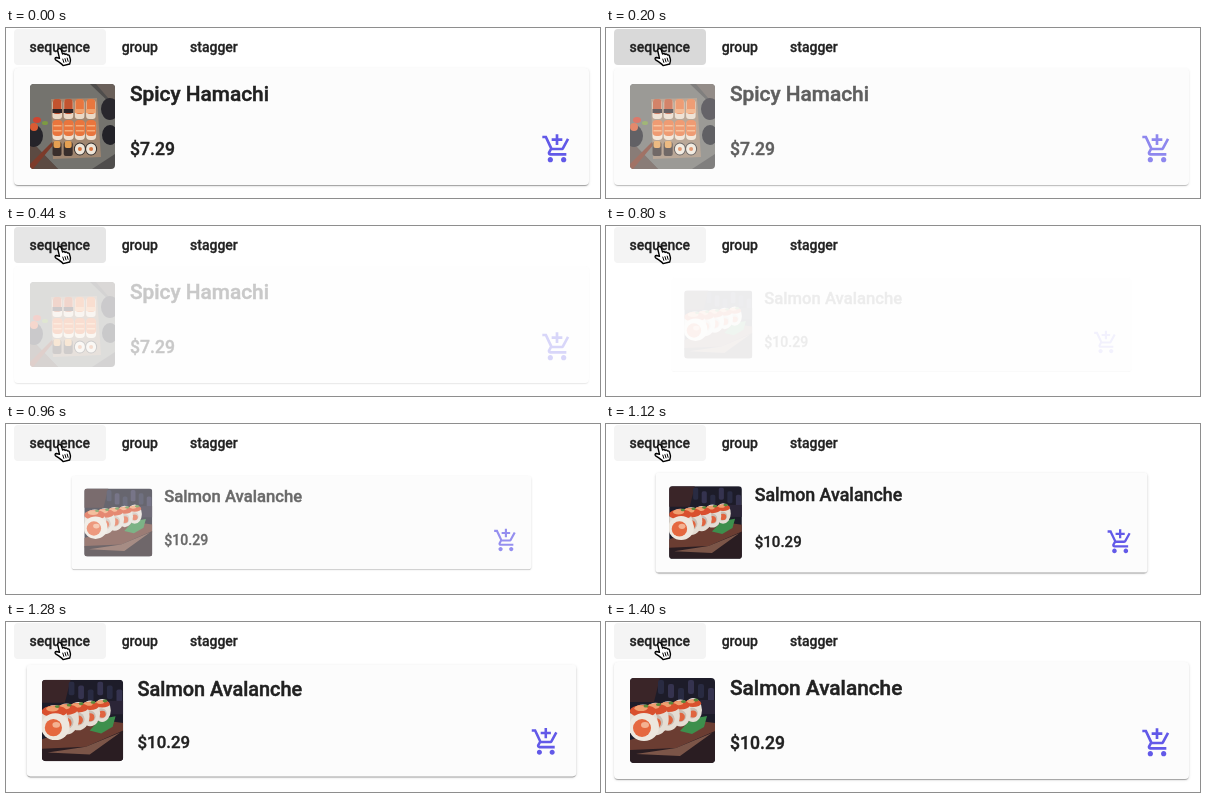
Write an HTML page that moves like this. It is 594 px wide and 170 px high and loops after 1920 ms.

```html
<!DOCTYPE html>
<html lang="en">
<head>
<meta charset="utf-8">
<title>Animated product card</title>
<style>
  html, body { margin: 0; width: 100%; height: 100%; overflow: hidden; background: #fff; }
  svg { position: absolute; left: 0; top: 0; }
  text { font: 500 14px Roboto, Arial, sans-serif; fill: #212121; stroke: #212121; stroke-width: .3px; }
  .card {
    left: 8px; top: 40px; overflow: visible;
    background: #fcfcfc; border-radius: 4px;
    box-shadow: 0 2px 1px -1px rgba(0,0,0,.2), 0 1px 1px rgba(0,0,0,.14), 0 1px 3px rgba(0,0,0,.12);
  }
  .card .title { font-size: 20.8px; stroke-width: .5px; }
  .card .price { font-size: 17.6px; stroke-width: .4px; }
</style>
</head>
<body>
<svg width="594" height="170">
  <defs>
    <clipPath id="button"><rect x="8" y="1" width="92" height="36" rx="4"/></clipPath>
    <clipPath id="photo"><rect width="85" height="85" rx="4"/></clipPath>
    <path id="cart" d="M11 9h2V6h3V4h-3V1h-2v3H8v2h3v3zm-4 9c-1.1 0-1.99.9-1.99 2S5.9 22 7 22s2-.9 2-2-.9-2-2-2zm10 0c-1.1 0-1.99.9-1.99 2s.89 2 1.99 2 2-.9 2-2-.9-2-2-2zm-9.83-3.25l.03-.12.9-1.63h7.45c.75 0 1.41-.41 1.75-1.03l3.86-7.01L19.42 4h-.01l-1.1 2-2.76 5H8.53l-.13-.27L6.16 6l-.95-2-.94-2H1v2h2l3.6 7.59-1.35 2.45c-.16.28-.25.61-.25.96 0 1.1.9 2 2 2h12v-2H7.42c-.13 0-.25-.11-.25-.25z"/>
  </defs>
  <g clip-path="url(#button)">
    <rect x="8" y="1" width="92" height="36" fill="#f4f4f4"/>
    <circle id="ripple" cx="55" cy="22"/>
  </g>
  <text x="23.5" y="24">sequence</text>
  <text x="115.7" y="24">group</text>
  <text x="184" y="24">stagger</text>
</svg>
<div id="cards"></div>
<svg width="594" height="170">
  <g transform="translate(-.8 -.4)" stroke="#000" stroke-linejoin="round" stroke-linecap="round">
    <path fill="#fff" stroke-width="1.4" d="M52.6 23.4c-.4-1.4.4-2.2 1.2-2.4 1-.3 1.9.3 2.2 1.3l1.4 4.2c.8-.8 2-.7 2.5.3.9-.7 2-.4 2.4.6 1-.4 1.8.2 2 1.2l.9 3.2c.3 1.4-.1 3-.7 4.6l-6.6 1.6c-1-1.5-2.6-2.5-4.3-3.7l-3.2-2.1c-1-.7-.6-2.4 1-2.3l2.9.8z"/>
    <path fill="none" d="M57.6 31.5l1 3.3M59.8 31l1 3.3M62 30.5l.9 3.2"/>
  </g>
</svg>
<script>
const LOOP = 1920;
const cards = document.getElementById('cards');
const ripple = document.getElementById('ripple');

const rect = (x, y, w, h, fill, rx = 0) =>
  `<rect x="${x}" y="${y}" width="${w}" height="${h}" rx="${rx}" fill="${fill}"/>`;
const oval = (x, y, rx, ry, fill) =>
  `<ellipse cx="${x}" cy="${y}" rx="${rx}" ry="${ry}" fill="${fill}"/>`;
const shape = (d, fill) => `<path d="${d}" fill="${fill}"/>`;
const repeat = (n, draw) => Array.from({ length: n }, (_, i) => draw(i)).join('');

// Rows of sushi on a slate board, seen from above
const platter =
  rect(0, 0, 85, 85, '#4f4d4c') +
  shape('M0 0H60L85 24V70L62 85H28L0 56Z', '#74736e') +
  shape('M0 56L28 85H0Z', '#5c4a42') +
  shape('M66 0H85V22Z', '#6a605a') +
  shape('M0 80L22 58L24 60L3 85H0Z', '#7d3b2a') +
  oval(4, 52, 9, 11, '#25242a') + oval(80, 25, 9, 11, '#29272d') + oval(80, 51, 8, 10, '#222228') +
  oval(7, 36, 4, 3, '#cf4530') + oval(4, 43, 4, 4, '#d95b33') + oval(15, 39, 3, 2, '#7d9a42') +
  shape('M21 15L67 14L71 73L23 75Z', '#a08670') +
  repeat(4, i => {
    const x = 22.5 + i * 11.2, dark = i < 2;
    return rect(x, 16, 9.5, 19, '#ead9c6', 3) + rect(x + .5, 15, 8.5, 15, dark ? '#c2532f' : '#e8773f', 3) +
      rect(x, 25, 9.5, 4, dark ? '#2d2426' : '#f0a16d') +
      rect(x, 37, 10, 19, '#f0dfcd', 4) + rect(x, 36, 10, 16, '#e9753d', 4) +
      rect(x + 1, 41, 8, 1.5, '#f6ad7a') + rect(x + 1, 46, 8, 1.5, '#f6ad7a') +
      (dark
        ? rect(x, 58, 9, 14, '#3a2f2c', 2) + rect(x + 1, 57, 7, 7, '#e5a052', 2)
        : oval(x + 5, 65, 6, 6.5, '#34302f') + oval(x + 5, 65, 5, 5.5, '#eee5d8') + oval(x + 5, 65, 2, 2, '#d7733f'));
  });

// Row of topped rolls on a dark table, seen from the side
const rolls =
  rect(0, 0, 85, 85, '#1d1c29') +
  shape('M0 0H30L24 24H0Z', '#3a2528') +
  repeat(6, i => rect(28 + i * 10, 2 + i % 3 * 4, 6, 14, i % 2 ? '#35334f' : '#292b42', 2)) +
  rect(58, 22, 27, 14, '#2b2537') +
  shape('M0 62L62 42L85 45V55L46 72L0 74Z', '#6b3d32') +
  shape('M0 72L46 70L85 53V85H0Z', '#2a1d22') +
  shape('M6 76L46 70L82 55L50 78Z', '#7b5548') +
  shape('M50 53L61 41L77 38L74 49L62 56Z', '#3d8f4c') +
  repeat(5, i => {
    const x = 63 - i * 12.5, y = 32 + i * 3, r = 9 + i * 1.4;
    return oval(x, y, r, r + 3, '#e4ddd4') + oval(x - 1, y + 3, r * .65, r * .6, '#c9bdb3') +
      oval(x, y + 4, r * .42, r * .4, '#e0643f') +
      oval(x, y - r * .75, r * .9, r * .42, '#d9502e') + oval(x - 2, y - r * .95, r * .45, r * .2, '#f0a070') +
      oval(x + 3, y - r * 1.1, 2.5, 1.5, '#5a8a3c');
  }) +
  oval(14, 49, 15, 14, '#ede7de') + oval(12, 50, 9, 9, '#e5683f') + oval(15, 47, 4, 3, '#f4b292');

function addCard(title, price, photo) {
  cards.insertAdjacentHTML('beforeend', `<svg class="card" width="575" height="117">
    <g transform="translate(16 16)" clip-path="url(#photo)">${photo}</g>
    <text class="title" x="116" y="33">${title}</text>
    <text class="price" x="116" y="87">${price}</text>
    <use href="#cart" transform="translate(527 65) scale(1.3333)" fill="#6259e8"/>
  </svg>`);
  return cards.lastElementChild.style;
}

const leaving = addCard('Spicy Hamachi', '$7.29', platter);
const entering = addCard('Salmon Avalanche', '$10.29', rolls);

const progress = (t, from, to) => Math.min(1, Math.max(0, (t - from) / (to - from)));

function draw() {
  const t = performance.now() % LOOP;

  const spread = 1 - (1 - progress(t, 30, 265)) ** 3;
  ripple.setAttribute('r', 52 * spread);
  ripple.setAttribute('opacity', .11 * (1 - progress(t, 340, 550)));

  // The old card fades out, then the new one fades in and grows
  leaving.opacity = 1 - progress(t, 60, 560);
  entering.opacity = progress(t, 780, 1050);
  entering.transform = `scale(${.8 + .2 * progress(t, 1032, 1351)})`;

  requestAnimationFrame(draw);
}
draw();
</script>
</body>
</html>
```
